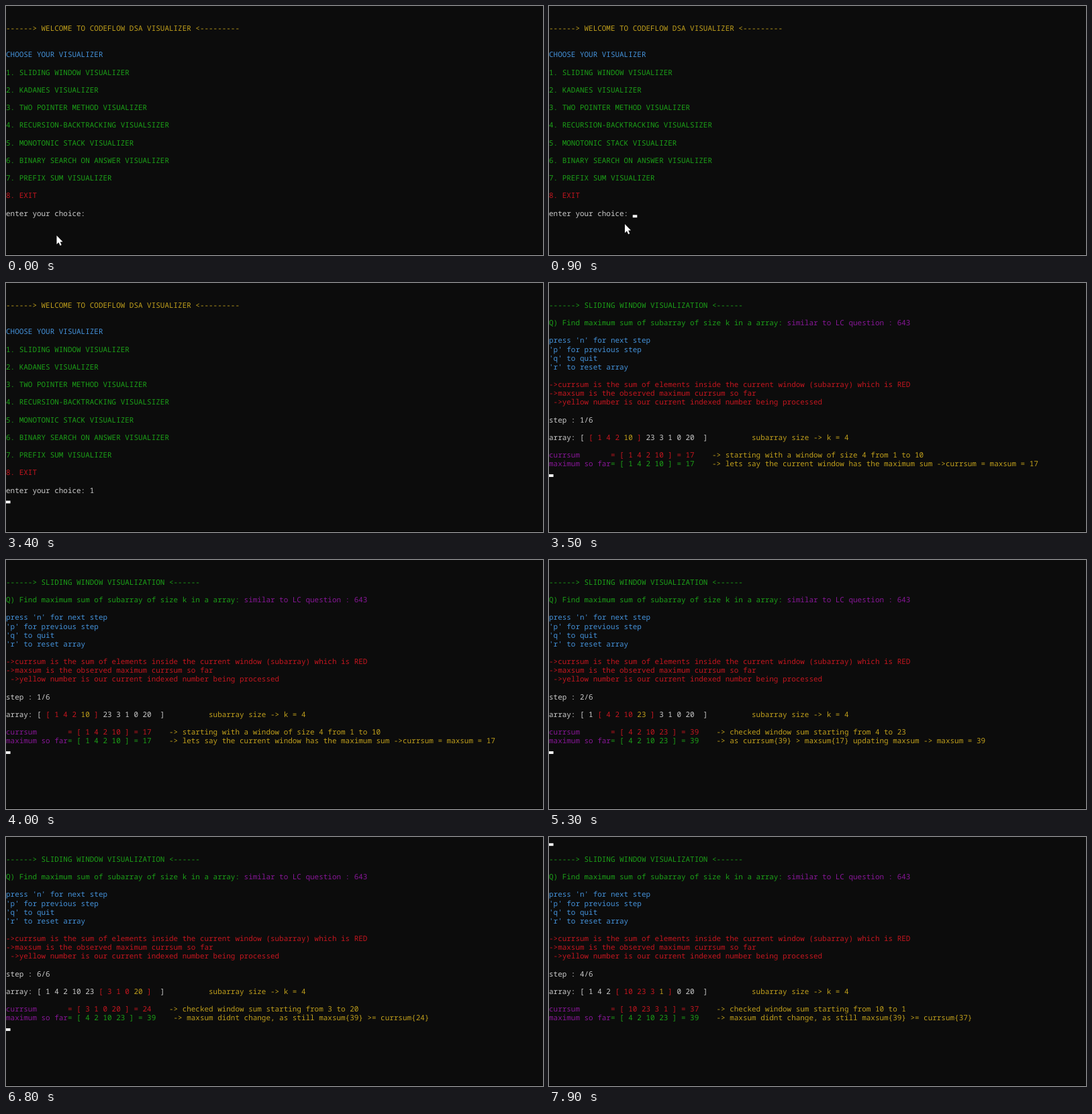
An HTML page with a canvas for the animation above (8000 ms loop, 800x371 px).

```html
<!DOCTYPE html>
<html lang="en">
<head>
<meta charset="utf-8">
<title>Sliding window visualizer</title>
<style>
html, body { margin: 0; width: 100%; height: 100%; overflow: hidden; background: #0c0c0c; }
canvas { display: block; }
</style>
</head>
<body>
<canvas id="stage" width="800" height="371"></canvas>
<script>
const ctx = document.getElementById('stage').getContext('2d');
const LOOP = 8000;
const COL = 6.566, ROW = 13.13;
const BG = '#0c0c0c', WHITE = '#cccccc', YELLOW = '#c1a01c', GREEN = '#1ca118';
const BLUE = '#4492da', RED = '#c5161f', PURPLE = '#881798';

const NUMS = [1, 4, 2, 10, 23, 3, 1, 0, 20];
const SIZE = 4;
const MENU = [
  'SLIDING WINDOW VISUALIZER', 'KADANES VISUALIZER', 'TWO POINTER METHOD VISUALIZER',
  'RECURSION-BACKTRACKING VISUALSIZER', 'MONOTONIC STACK VISUALIZER',
  'BINARY SEARCH ON ANSWER VISUALIZER', 'PREFIX SUM VISUALIZER', 'EXIT'
];

// [start time, step shown]
const STEPS = [[3500, 1], [4900, 2], [5500, 3], [5900, 4], [6300, 5], [6600, 6], [7300, 5], [7600, 4]];

// [start time, column, row]; a missing column means the caret is hidden
const CARET = [
  [0], [800, 19, 23], [1300], [1900, 19, 23], [2100, 20, 23], [2400], [2900, 20, 23],
  [3300, 0, 24], [3500, 0, 21], [4500], [4800, 0, 0], [4900, 0, 21],
  [7200, 0, 0], [7300, 0, 21], [7900, 0, 0]
];

const latest = (list, t) => list.filter(e => e[0] <= t).pop();
const sum = list => list.reduce((a, b) => a + b, 0);

// Prints [text, colour] pairs one after another on the character grid.
function print(row, ...parts) {
  const y = Math.round(10.6 + row * ROW);
  let col = 0;
  for (const [text, color] of parts) {
    ctx.fillStyle = color;
    for (const ch of text) {
      if (ch !== ' ') ctx.fillText(ch, col * COL, y);
      col++;
    }
  }
}

function drawMenu(t) {
  print(2, ['------> WELCOME TO CODEFLOW DSA VISUALIZER <---------', YELLOW]);
  print(5, ['CHOOSE YOUR VISUALIZER', BLUE]);
  MENU.forEach((name, i) => print(7 + 2 * i, [`${i + 1}. ${name}`, i === 7 ? RED : GREEN]));
  print(23, ['enter your choice: ' + (t >= 2100 ? '1' : ''), WHITE]);
}

function bestWindow(step) {
  let best = NUMS.slice(0, SIZE);
  for (let i = 1; i < step; i++) {
    const next = NUMS.slice(i, i + SIZE);
    if (sum(next) > sum(best)) best = next;
  }
  return best;
}

function notes(step, win) {
  const first = win[0], last = win[SIZE - 1], total = sum(win);
  if (step === 1) return [
    `starting with a window of size ${SIZE} from ${first} to ${last}`,
    `lets say the current window has the maximum sum ->currsum = maxsum = ${total}`
  ];
  const before = sum(bestWindow(step - 1));
  return [
    `checked window sum starting from ${first} to ${last}`,
    total > before
      ? `as currsum{${total}} > maxsum{${before}} updating maxsum -> maxsum = ${total}`
      : `maxsum didnt change, as still maxsum{${before}} >= currsum{${total}}`
  ];
}

function drawSteps(step) {
  const start = step - 1;
  const win = NUMS.slice(start, start + SIZE);
  const best = bestWindow(step);
  const [currNote, maxNote] = notes(step, win);
  const spaced = list => list.map(n => n + ' ').join('');
  const result = list => `= [ ${spaced(list)}] = ${sum(list)}    `;

  print(2, ['------> SLIDING WINDOW VISUALIZATION <------', GREEN]);
  print(4, ['Q) Find maximum sum of subarray of size k in a array: ', GREEN],
    ['similar to LC question : 643', PURPLE]);
  ["press 'n' for next step", "'p' for previous step", "'q' to quit", "'r' to reset array"]
    .forEach((line, i) => print(6 + i, [line, BLUE]));
  ['->currsum is the sum of elements inside the current window (subarray) which is RED',
    '->maxsum is the observed maximum currsum so far',
    ' ->yellow number is our current indexed number being processed']
    .forEach((line, i) => print(11 + i, [line, RED]));

  print(15, [`step : ${step}/${NUMS.length - SIZE + 1}`, WHITE]);
  print(17,
    ['array: [ ' + spaced(NUMS.slice(0, start)), WHITE],
    ['[ ' + spaced(win.slice(0, -1)), RED],
    [win[SIZE - 1] + ' ', YELLOW],
    ['] ', RED],
    [spaced(NUMS.slice(start + SIZE)) + ' ]', WHITE],
    [' '.repeat(10) + `subarray size -> k = ${SIZE}`, YELLOW]);
  print(19, ['currsum'.padEnd(14), PURPLE], [result(win), RED], ['-> ' + currNote, YELLOW]);
  print(20, ['maximum so far', PURPLE], [result(best), GREEN], ['-> ' + maxNote, YELLOW]);
}

function drawCaret(t) {
  const [, col, row] = latest(CARET, t);
  if (col === undefined) return;
  ctx.fillStyle = '#fff';
  ctx.fillRect(col * COL, 9.3 + row * ROW, COL, 3.9);
}

function drawPointer(t) {
  if (t >= 1000) return;
  const k = Math.min(1, t / 900);
  const e = k * k * (3 - 2 * k);
  ctx.save();
  ctx.translate(75.5 + 37.5 * e, 342 - 17 * e);
  ctx.beginPath();
  [[0, 0], [0, 13], [3, 10.3], [5.2, 15], [7.2, 14], [5.2, 9.5], [9, 9.2]]
    .forEach(([x, y]) => ctx.lineTo(x, y));
  ctx.closePath();
  ctx.fillStyle = '#fff';
  ctx.fill();
  ctx.restore();
}

function draw() {
  const t = performance.now() % LOOP;
  ctx.fillStyle = BG;
  ctx.fillRect(0, 0, 800, 371);
  ctx.fillStyle = '#000';
  ctx.fillRect(0, 370, 800, 1);
  ctx.font = '10.94px "Noto Sans Mono", "DejaVu Sans Mono", monospace';
  ctx.textRendering = 'geometricPrecision';
  const step = latest(STEPS, t);
  if (step) drawSteps(step[1]);
  else drawMenu(t);
  drawCaret(t);
  drawPointer(t);
  requestAnimationFrame(draw);
}
draw();
</script>
</body>
</html>
```
